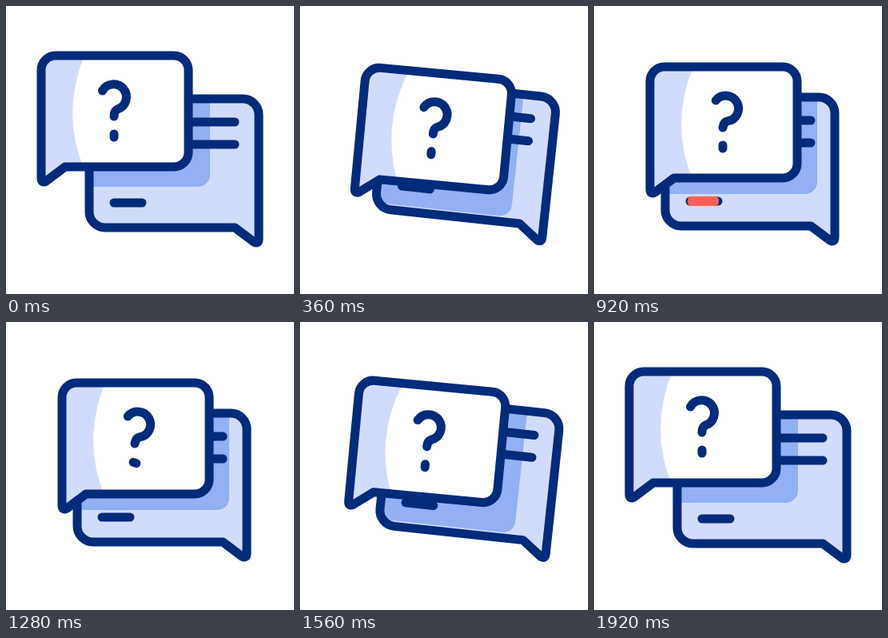
These frames come from a looping animation (360x360 px, 2 s). An HTML page:

```html
<!DOCTYPE html>
<html lang="en">
<head>
<meta charset="utf-8">
<title>Chat bubbles</title>
<style>
  html, body { margin: 0; width: 100%; height: 100%; overflow: hidden; background: #fff; }
  svg { display: block; width: 100vw; height: 100vh; }
  .line { fill: none; stroke: #022b7a; stroke-width: 11; stroke-linecap: round; stroke-linejoin: round; }
  .red { stroke: #fd5f58; }
</style>
</head>
<body>
<svg viewBox="0 0 360 360">
  <defs>
    <path id="backShape"/>
    <path id="frontShape"/>
    <clipPath id="backClip"><use href="#backShape"/></clipPath>
    <clipPath id="frontClip"><use href="#frontShape"/></clipPath>
  </defs>
  <g id="back">
    <use href="#backShape" fill="#d1dcfc"/>
    <g clip-path="url(#backClip)">
      <rect id="shadow" x="20" y="20" rx="15" fill="#92b0f3"/>
    </g>
    <use href="#backShape" class="line"/>
    <path class="line" d="M200 145H286M200 173H286M135 246H170"/>
    <path id="lineMark" class="line red" d="M200 173H286"/>
    <rect id="dashMark" x="132" y="240" height="12" rx="5" fill="#fd5f58"/>
  </g>
  <g id="front">
    <use href="#frontShape" fill="#fff"/>
    <path clip-path="url(#frontClip)" fill="#d1dcfc" d="M30 50H103Q66 130 98 205V230H30Z"/>
    <use href="#frontShape" class="line"/>
    <path id="hook" class="line" d="M120.500 106A16 16 0 1 1 139.500 129Q135 131 135 138"/>
    <path id="dot" class="line" d="M135 160v4"/>
  </g>
</svg>
<script>
  const LOOP = 2000, STEP = 40, LAST = 1920;
  const part = id => document.getElementById(id);
  const [back, front, shadow, lineMark, dashMark, hook, dot] =
    ['back', 'front', 'shadow', 'lineMark', 'dashMark', 'hook', 'dot'].map(part);

  const clamp = k => Math.min(1, Math.max(0, k));
  const mix = (a, b, k) => a + (b - a) * k;
  // Eased rise from 0 to 1 between two times.
  const rise = (from, to, t) => (1 - Math.cos(Math.PI * clamp((t - from) / (to - from)))) / 2;

  // Rounded box with its tail at x; dir is 1 when the box extends right, -1 for left.
  function bubble(x, y, dir, width, height, r) {
    const at = d => x + dir * d;
    const bottom = y + height;
    const corner = (dx, dy) => `a${r} ${r} 0 0 ${dir > 0 ? 1 : 0} ${dir * dx * r} ${dy * r}`;
    return `M${x} ${y + r}${corner(1, -1)}H${at(width - r)}${corner(1, 1)}` +
      `V${bottom - r}${corner(-1, 1)}H${at(30)}L${at(6)} ${bottom + 18}` +
      `Q${x} ${bottom + 21} ${x} ${bottom + 14}Z`;
  }

  const place = (node, x, y, angle, px, py) =>
    node.setAttribute('transform', `translate(${x} ${y}) rotate(${angle} ${px} ${py})`);

  function draw(t) {
    const near = rise(80, 420, t) - rise(1460, 1700, t);
    // The swing plays forwards on the way in and backwards on the way out.
    const u = Math.min(t, LAST - t);
    const swing = 2.1 * rise(200, 315, u) - rise(0, 200, u) - 1.1 * rise(315, 550, u);

    // Each bubble swings on the tip of its tail.
    place(back, -15 * near, -2 * near, 6.1 * swing, 316, 297);
    place(front, 26 * near, 14 * near, 5.4 * swing, 44, 219);

    const right = mix(mix(61, 22, near), 42, clamp(swing));
    const bottom = mix(mix(51, 40, near), 7, Math.min(1, swing));
    shadow.setAttribute('width', 296 - right);
    shadow.setAttribute('height', 257 - bottom);

    place(hook, 0, 0, 10 * (rise(640, 920, t) - rise(1280, 1440, t)), 135, 138);
    place(dot, 0, 0, 180 * rise(1020, 1480, t), 135, 162);

    lineMark.setAttribute('opacity', 0.85 * (rise(500, 590, t) - rise(600, 700, t)));
    dashMark.setAttribute('width', 39 * (rise(740, 900, t) - rise(960, 1100, t)));
  }

  part('backShape').setAttribute('d', bubble(316, 116, -1, 212, 161, 20));
  part('frontShape').setAttribute('d', bubble(44, 62, 1, 184, 139, 18));

  const start = performance.now();
  function tick() {
    const t = (performance.now() - start) % LOOP;
    draw(Math.min(LAST, Math.floor(t / STEP) * STEP));
    requestAnimationFrame(tick);
  }
  tick();
</script>
</body>
</html>
```
